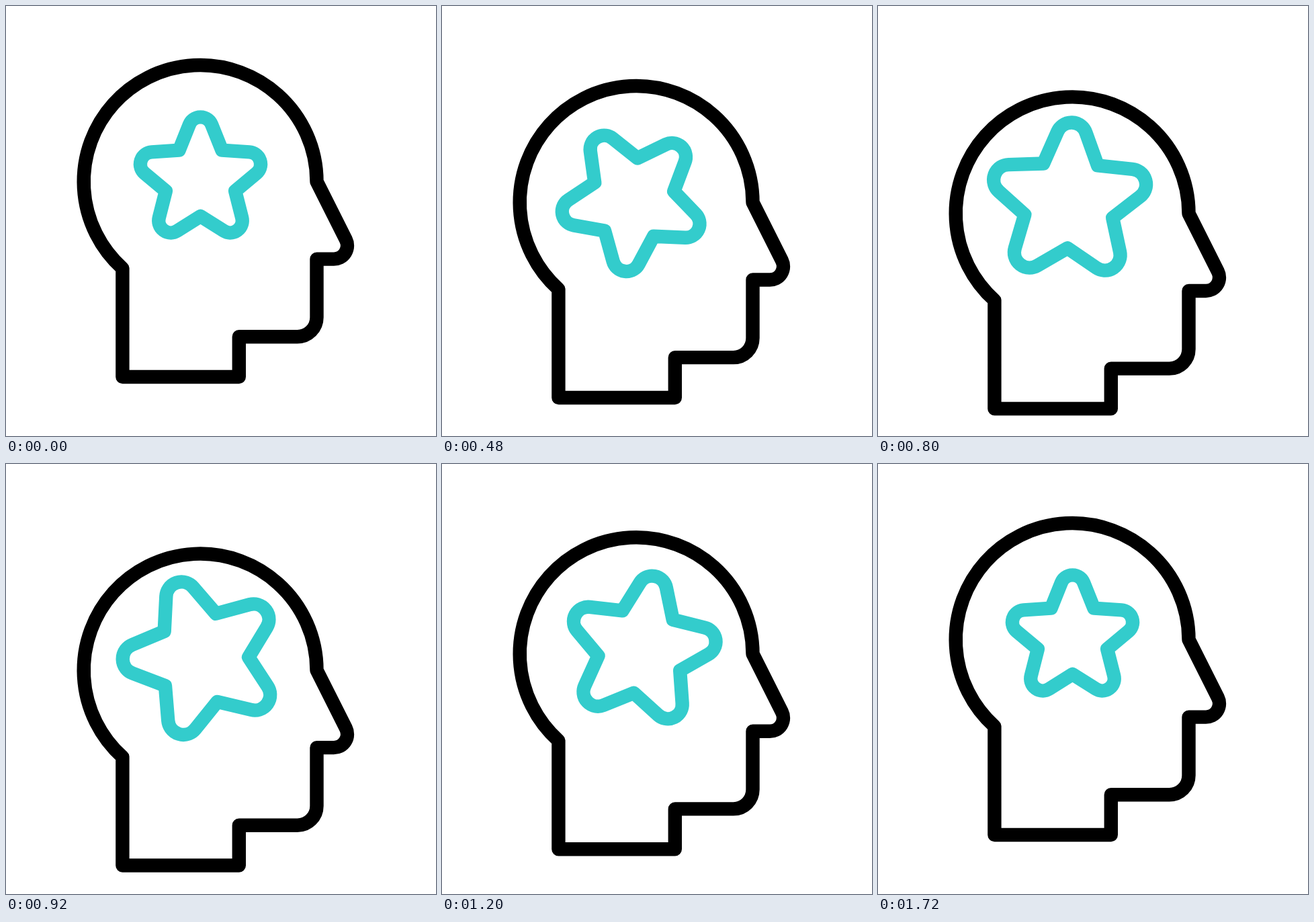
These frames come from a looping animation (640 by 640 pixels, 1920 ms). An HTML page with a canvas:

```html
<!DOCTYPE html>
<html lang="en">
<head>
<meta charset="utf-8">
<title>Star mind</title>
<style>
  html, body { margin: 0; width: 100%; height: 100%; overflow: hidden; background: #fff; }
  canvas { display: block; }
</style>
</head>
<body>
<canvas id="stage" width="640" height="640"></canvas>
<script>
const ctx = document.getElementById('stage').getContext('2d');
const LOOP = 1920, STEP = 40;
const DEG = Math.PI / 180;

const clamp = v => Math.min(1, Math.max(0, v));

// Same curve as cubic-bezier(.5, 0, .5, 1)
function ease(x) {
  let lo = 0, hi = 1;
  for (let i = 0; i < 24; i++) {
    const t = (lo + hi) / 2;
    if (1.5 * t * (1 - t) + t * t * t < x) lo = t; else hi = t;
  }
  return lo * lo * (3 - 2 * lo);
}

// Eased rise from start to peak, then the mirrored fall
const swell = (n, start, peak) => ease(clamp(1 - Math.abs(n - peak) / (peak - start)));

function stroke(color) {
  ctx.strokeStyle = color;
  ctx.lineWidth = 20.4;
  ctx.lineJoin = ctx.lineCap = 'round';
  ctx.stroke();
}

function drawHead() {
  ctx.beginPath();
  ctx.moveTo(173.4, 552);
  ctx.lineTo(173.4, 390.6);
  ctx.arc(289.1, 261.4, 173.4, Math.atan2(129.2, -115.7), 2 * Math.PI);
  ctx.arcTo(520.4, 376.6, 462.5, 376.6, 20);
  ctx.lineTo(462.5, 376.6);
  ctx.arcTo(462.5, 492.2, 346.8, 492.2, 28.8);
  ctx.lineTo(346.8, 492.2);
  ctx.lineTo(346.8, 552);
  ctx.closePath();
  stroke('#000');
}

function drawStar(angle, scale) {
  const centerY = 7, notch = 54.3, corner = 123.7, tipRadius = 18;
  const at = (radius, deg) => [
    radius * Math.sin(deg * DEG),
    centerY - radius * Math.cos(deg * DEG)
  ];
  ctx.save();
  ctx.translate(289.5, 251.6);
  ctx.rotate(angle);
  ctx.scale(scale, scale);
  ctx.beginPath();
  ctx.moveTo(...at(notch, -36));
  for (let deg = 0; deg < 360; deg += 72) {
    const next = at(notch, deg + 36);
    ctx.arcTo(...at(corner, deg), ...next, tipRadius);
    ctx.lineTo(...next);
  }
  ctx.closePath();
  ctx.restore(); // the line keeps its weight while the shape grows
  stroke('#33cccc');
}

function draw(time) {
  const n = Math.floor((time % LOOP) / STEP);
  ctx.fillStyle = '#fff';
  ctx.fillRect(0, 0, 640, 640);
  ctx.save();
  ctx.translate(0, 47.4 * swell(n, 1, 20));
  drawHead();
  drawStar(2 * Math.PI * ease(clamp((n - 1) / 42)), 1 + 0.271 * swell(n, 1, 22));
  ctx.restore();
}

const begin = performance.now();
function tick() {
  draw(performance.now() - begin);
  requestAnimationFrame(tick);
}
tick();
</script>
</body>
</html>
```
